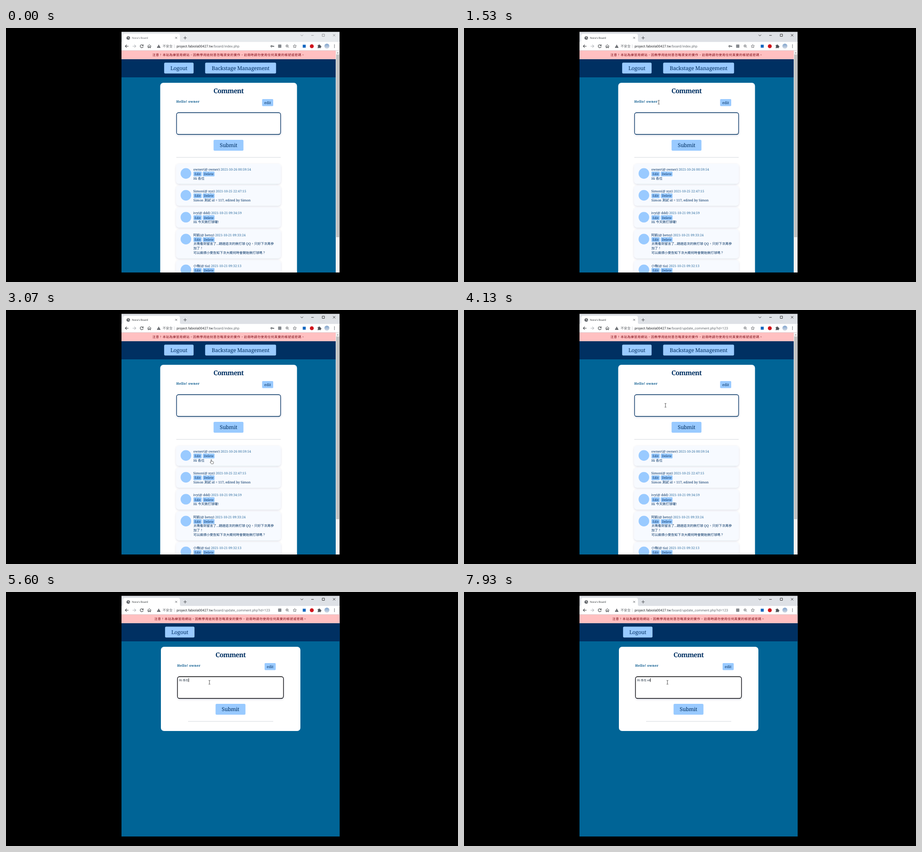
An HTML page for the animation above (8000 ms loop, 998 by 561 pixels).

```html
<!DOCTYPE html>
<html lang="zh-Hant">
<head>
<meta charset="utf-8">
<title>Message board</title>
<style>
html, body { margin: 0; width: 100%; height: 100%; overflow: hidden; background: #000; }
svg { display: block; width: 998px; height: 561px; }
text { white-space: pre; text-rendering: geometricPrecision; }
.slab { font-family: "Noto Serif", "Noto Sans CJK TC", "Noto Sans CJK", serif; }
.ui { font-family: Roboto, "Noto Sans CJK TC", "Noto Sans CJK", sans-serif; }
.tab { font-family: "Noto Sans", sans-serif; }
</style>
</head>
<body>
<svg id="stage" viewBox="0 0 998 561"></svg>
<script>
const NAVY = '#003062', SEA = '#006496', SKY = '#99caff', ICON = '#4d5156';
const LOOP = 8000, STEP = 1000 / 15;

const rect = (x, y, w, h, fill, r = 0, more = '') =>
  `<rect x="${x}" y="${y}" width="${w}" height="${h}" rx="${r}" fill="${fill}" ${more}/>`;
const text = (x, y, size, str, fill, more = '', cls = 'slab') =>
  `<text class="${cls}" x="${x}" y="${y}" font-size="${size}" fill="${fill}" ${more}>${str}</text>`;
const path = (d, color = ICON, w = 1, more = '') =>
  `<path d="${d}" fill="none" stroke="${color}" stroke-width="${w}" ${more}/>`;
const disc = (x, y, r, fill, more = '') =>
  `<circle cx="${x}" cy="${y}" r="${r}" fill="${fill}" ${more}/>`;
const group = (id, body) => `<g id="${id}">${body}</g>`;
const MID = 'text-anchor="middle"';

function button(x, y, w, h, label, size, base) {
  const spacing = size > 10 ? 'letter-spacing="-.2"' : '';
  return rect(x, y, w, h, SKY, size > 10 ? 2.5 : 1.8) +
    text(x + w / 2, base, size, label, NAVY, `${MID} ${spacing} font-weight="500"`);
}

const HELLO = 'font-weight="700" letter-spacing=".35"';

// Parts shared by both pages; x is the left edge of the text column.
function header(x, cx, width, editX, boxW, id) {
  return rect(255, 49.5, width, 491, SEA) +
    rect(255, 49.5, width, 19.5, '#ffc0c1') +
    text(cx + .2, 62.4, 7, '注意！本站為練習用網站，因教學用途刻意忽略資安的實作，註冊時請勿使用任何真實的帳號或密碼。',
      '#7c0712', `${MID} letter-spacing=".48" font-weight="500"`) +
    rect(255, 69, width, 40, NAVY) +
    button(x - 26.8, 76.5, 65, 24, 'Logout', 11.7, 93);
}

function form(x, cx, editX, boxW, id) {
  return text(cx, 143.6, 14.6, 'Comment', NAVY, `${MID} font-weight="700" letter-spacing="-.7"`) +
    text(x, 164.7, 7.2, 'Hello! owner', '#00548a', HELLO) +
    button(editX, 157, 24.5, 15.5, 'edit', 8.2, 167.8) +
    rect(x + .6, 187, boxW, 48, '#fff', 4.5, `id="${id}" stroke="${NAVY}" stroke-width="1.3" filter="url(#soft)"`) +
    path(`M${x + boxW - 4} 233.5l3.5 -3.5m-1.5 3.5l1.5 -1.5`, '#888', .5) +
    button(cx - 33, 247, 66, 24, 'Submit', 11.7, 263.3);
}

function comment(top, height, name, date, lines) {
  return rect(375.8, top, 230.8, height, '#f7faff', 6, 'filter="url(#soft)"') +
    disc(397.2, top + 21.3, 11.7, SKY) +
    text(413.5, top + 14.8, 7.25, `${name} <tspan fill="#2c6c9f" font-weight="400">${date}</tspan>`, NAVY, 'font-weight="500"') +
    button(413.8, top + 17, 18.4, 10.7, 'Edit', 7.2, top + 25) +
    button(434.5, top + 17, 26, 10.7, 'Delete', 7.2, top + 25) +
    lines.map((s, i) => text(413.8, top + 34.5 + i * 9.6, 7.25, s, NAVY,
      `font-weight="${lines.length > 1 ? 400 : 500}"`)).join('');
}

function boardPage() {
  return header(376, 491.3, 473) +
    button(439.7, 76.5, 156.6, 24, 'Backstage Management', 11.7, 93) +
    rect(340.5, 121, 302, 440, '#fff', 7) +
    form(376, 491.3, 565.5, 229.8, 'boxA') +
    rect(376, 285.3, 230.5, 1, '#d4d8dc') +
    comment(300, 44, 'owner(@ owner)', '2021-10-26 00:59:54', ['Hi 各位']) +
    comment(348.2, 44, 'Simon(@ xyz)', '2021-10-25 22:47:15', ['Simon 測試 id = 117, edited by Simon']) +
    comment(396.6, 44, 'ivy(@ ddd)', '2021-10-21 09:34:59', ['Hi 今天揪打球囉!']) +
    comment(444.9, 63.5, '阿凱(@ betsy)', '2021-10-21 09:33:24',
      ['太晚看到留言了...錯過這次的揪打球 QQ，只好下次再參', '加了！', '可以麻煩小雯告知下次大概何時會開始揪打球嗎？']) +
    comment(513, 44, '小梅(@ tia)', '2021-10-21 09:32:13', ['']) +
    rect(728, 49.5, 8.7, 491, '#f1f1f1') +
    rect(729, 58.5, 6.7, 403.5, '#c1c1c1') +
    '<path d="M730.4 55.8l2 -2.4l2 2.4z" fill="#8a8a8a"/>' +
    group('sel', rect(402, 157.3, 26.3, 9.8, '#2f83dc') +
      text(376, 164.7, 7.2, 'Hello! owner', '#fff', HELLO));
}

function editPage() {
  return header(378, 495.7, 482) +
    rect(342, 121, 308, 186, '#fff', 7) +
    form(378, 495.7, 571, 234, 'boxB') +
    rect(402, 285.3, 188, 1, '#d4d8dc') +
    text(382, 197.3, 6.2, 'Hi 各位', '#1c2b3c', 'id="typed"') +
    rect(403, 190.3, .8, 8.4, '#000', 0, 'id="caret"');
}

function browserBar() {
  const url = (id, rest) => text(376.5, 42.9, 7.6,
    `project.fabiola00427.tw<tspan fill="#6b7075">${rest}</tspan>`, '#2b2e32', `id="${id}"`, 'ui');
  return rect(255, 8.3, 481.7, 23.5, '#dee1e6', 0, 'id="strip"') +
    '<path d="M255 31q3.5 0 3.5 -3.5V17q0 -4 4 -4H380q4 0 4 4V27.5q0 3.500 3.500 3.500z" fill="#fff"/>' +
    rect(255, 30.8, 481.7, 18.9, '#fff') +
    disc(270, 22, 3.8, '#4a4e53') +
    path('M267.500 20l2 .5l.5 2l-1 2M271 19l-.5 2l2 1.500l-.5 1.500', '#fff', .8) +
    text(278, 24.2, 5.9, 'Nora\'s Board', '#3c4043', 'id="title"', 'tab') +
    path('M373.700 19.700l4 4m0 -4l-4 4', ICON, .9) +
    path('M392 21.800h7m-3.500 -3.500v7', ICON, 1) +
    group('winIcons',
      path('M650.500 14.800l2.800 2.800l2.800 -2.800M674 16.300h5.500M698.200 13.500h5v5h-5zM722 13.500l5 5m0 -5l-5 5', '#222', .9)) +
    path('M270.500 40.200h-7m3 -3.200l-3.200 3.200l3.200 3.200', '#3c4043', 1.1) +
    path('M279.500 40.200h7m-3 -3.200l3.200 3.200l-3.200 3.200', '#b3b6ba', 1.1) +
    path('M302.300 38.300a3.300 3.300 0 1 0 .6 2.500M303 36.400v2.500h-2.600', '#3c4043', 1.1) +
    path('M312.500 40.300l4 -3.600l4 3.600M313.700 39.700v4h1.800v-2.600h2v2.600h1.800v-4', '#3c4043', 1) +
    '<path d="M337.200 36.500l4 7.200h-8z" fill="#4d5156"/>' +
    path('M337.200 39v2.300m0 .7v1', '#fff', .8) +
    text(345.7, 42.800, 7.4, '不安全', '#5f6368', '', 'ui') +
    rect(371, 36.300, .8, 8, '#c6c9cd') +
    url('urlA', '/board/index.php') + url('urlB', '/board/update_comment.php?id=123') +
    group('key', disc(586.3, 40.2, 1.6, 'none', `stroke="${ICON}" stroke-width="1.2"`) +
      path('M588 40.200h4m-1 0v1.800', ICON, 1.3)) +
    group('translate', rect(600.8, 36.5, 7.2, 7.2, '#85898e', 1)) +
    disc(620.6, 39.6, 2.5, 'none', `stroke="${ICON}" stroke-width=".9"`) +
    path('M622.500 41.500l2 2M619.300 39.600h2.600', ICON, .9) +
    path('M637.600 36.500l1.100 2.400l2.600 .3l-2 1.700l.6 2.600l-2.300 -1.400l-2.300 1.400l.6 -2.600l-2 -1.700l2.600 -.3z', ICON, .8) +
    rect(655.2, 36.900, 6.6, 6.6, '#1667c0') +
    disc(675.2, 40.2, 4.3, '#d0131b') +
    '<path d="M688.300 38h2v-.6a1.200 1.200 0 0 1 2.400 0v.6h2v2h.5a1.200 1.200 0 0 1 0 2.400h-.5v2h-2.200a1 1 0 0 0 -2 0h-2.200v-2.200a1 1 0 0 0 0 -2z" fill="#4d5156"/>' +
    disc(708.5, 40, 5.5, 'url(#sky)') +
    [37.300, 40.200, 43.100].map(y => disc(725.3, y, .85, ICON)).join('') +
    rect(255, 49.2, 481.7, .5, '#e2d5d8');
}

const cursors = {
  arrow: '<path d="M0 0V8.400L2 6.600L3.300 9.700L4.600 9.100L3.300 6.200H5.900z" fill="#fff" stroke="#111" stroke-width=".6"/>',
  beam: path('M-1.900 -4.200h1.400l.5 .5l.5 -.5h1.400M-1.900 4.200h1.400l.5 -.5l.5 .5h1.400M0 -3.700v7.400', '#222', .8),
  hand: '<path d="M-.8 .5q.8 -1 1.600 0v3.400l3.500 .8q.9 .3 .8 1.300l-.8 3.500h-4.300l-2.600 -3.300q-.3 -1 .7 -.9l1.100 .7z" fill="#fff" stroke="#111" stroke-width=".6"/>'
};

const stage = document.getElementById('stage');
stage.innerHTML = `<defs>
  <filter id="soft" x="-10%" y="-20%" width="120%" height="150%">
    <feDropShadow dx="0" dy="1.5" stdDeviation="2" flood-color="#003062" flood-opacity=".15"/></filter>
  <linearGradient id="sky" x2="0" y2="1"><stop stop-color="#7fa3cd"/><stop offset="1" stop-color="#d3dae4"/></linearGradient>
  <clipPath id="selClip"><rect id="selRect" x="402" y="157.300" width="26.300" height="9.800"/></clipPath>
  <clipPath id="window"><rect x="255" y="8.300" width="481.700" height="531.700"/></clipPath></defs>
  <g clip-path="url(#window)">` +
  group('board', boardPage()) + group('edit', editPage()) + browserBar() +
  group('pointer', Object.entries(cursors).map(([id, body]) => group(id, body)).join('')) + '</g>';

const $ = id => document.getElementById(id);
const show = (id, on) => $(id).setAttribute('display', on ? 'inline' : 'none');
$('sel').setAttribute('clip-path', 'url(#selClip)');

// time, x, y of the pointer's hot spot
const route = [
  [470, 732, 381], [700, 556, 232], [930, 447.5, 153.3], [1270, 439, 164],
  [1330, 439, 164], [2130, 403.8, 164], [2470, 403.8, 164], [2690, 503, 214],
  [3070, 453, 331], [3330, 453, 330.5], [3600, 421, 323], [3870, 421, 323],
  [4130, 444.7, 211.5], [4200, 446.8, 196], [4330, 449.2, 199.5]
];
// time, typed suffix, caret visible
const typing = [
  [0, '', 0], [4530, '', 1], [5070, '', 0], [5600, '', 1], [6070, ' ', 1], [6470, ' e', 1],
  [6670, ' ', 1], [7000, ' ', 0], [7530, ' ', 1], [7600, ' e', 1], [7930, ' ed', 1]
];
const caretShift = [0, 1.6, 4.7, 8.3];

function pointerAt(t) {
  const i = route.findIndex(p => p[0] > t);
  if (i < 0) return route[route.length - 1].slice(1);
  if (i === 0) return route[0].slice(1);
  const [t0, x0, y0] = route[i - 1], [t1, x1, y1] = route[i];
  const k = (t - t0) / (t1 - t0);
  return [x0 + (x1 - x0) * k, y0 + (y1 - y0) * k];
}

function draw(ms) {
  const t = Math.floor((ms + 4) / STEP) * STEP + 1;
  const editing = t >= 4195, active = t >= 1260, newUrl = t >= 3865;
  show('board', !editing);
  show('edit', editing);
  show('urlA', !newUrl);
  show('urlB', newUrl);
  show('key', !newUrl);
  show('translate', !newUrl || editing);
  $('strip').setAttribute('fill', active ? '#dee1e6' : '#e7eaed');
  $('title').setAttribute('fill', active ? '#3c4043' : '#686c70');
  $('winIcons').setAttribute('opacity', active ? 1 : .45);

  const [x, y] = pointerAt(t);
  const inBox = x > 378 && x < 606 && y > 188 && y < 235;
  const onHello = x < 434 && y > 157 && y < 168;
  const onButton = !editing && x < 461 && x > 413 && y > 317 && y < 333;
  const kind = inBox || onHello ? 'beam' : onButton ? 'hand' : 'arrow';
  for (const id in cursors) show(id, id === kind);
  show('pointer', t >= 465);
  $('pointer').setAttribute('transform', `translate(${x.toFixed(2)} ${y.toFixed(2)})`);

  const from = t > 2100 ? 402 : 402 + Math.round((x - 402) / 5.25) * 5.25;
  show('sel', t > 1330 && t < 2690 && from < 428);
  $('selRect').setAttribute('x', from);
  $('selRect').setAttribute('width', Math.max(0, 428.3 - from));

  const focus = Math.min(1, Math.max(0, (t - 4530) / 340));
  $('boxB').setAttribute('stroke', `rgb(0,${Math.round(48 * (1 - focus))},${Math.round(98 * (1 - focus))})`);
  const [, suffix, caretOn] = typing.filter(s => s[0] <= t + 5).pop();
  $('typed').textContent = 'Hi 各位' + suffix;
  show('caret', caretOn);
  $('caret').setAttribute('x', 403 + caretShift[suffix.length]);
}

const start = performance.now();
function tick() {
  draw((performance.now() - start) % LOOP);
  requestAnimationFrame(tick);
}
tick();
</script>
</body>
</html>
```
